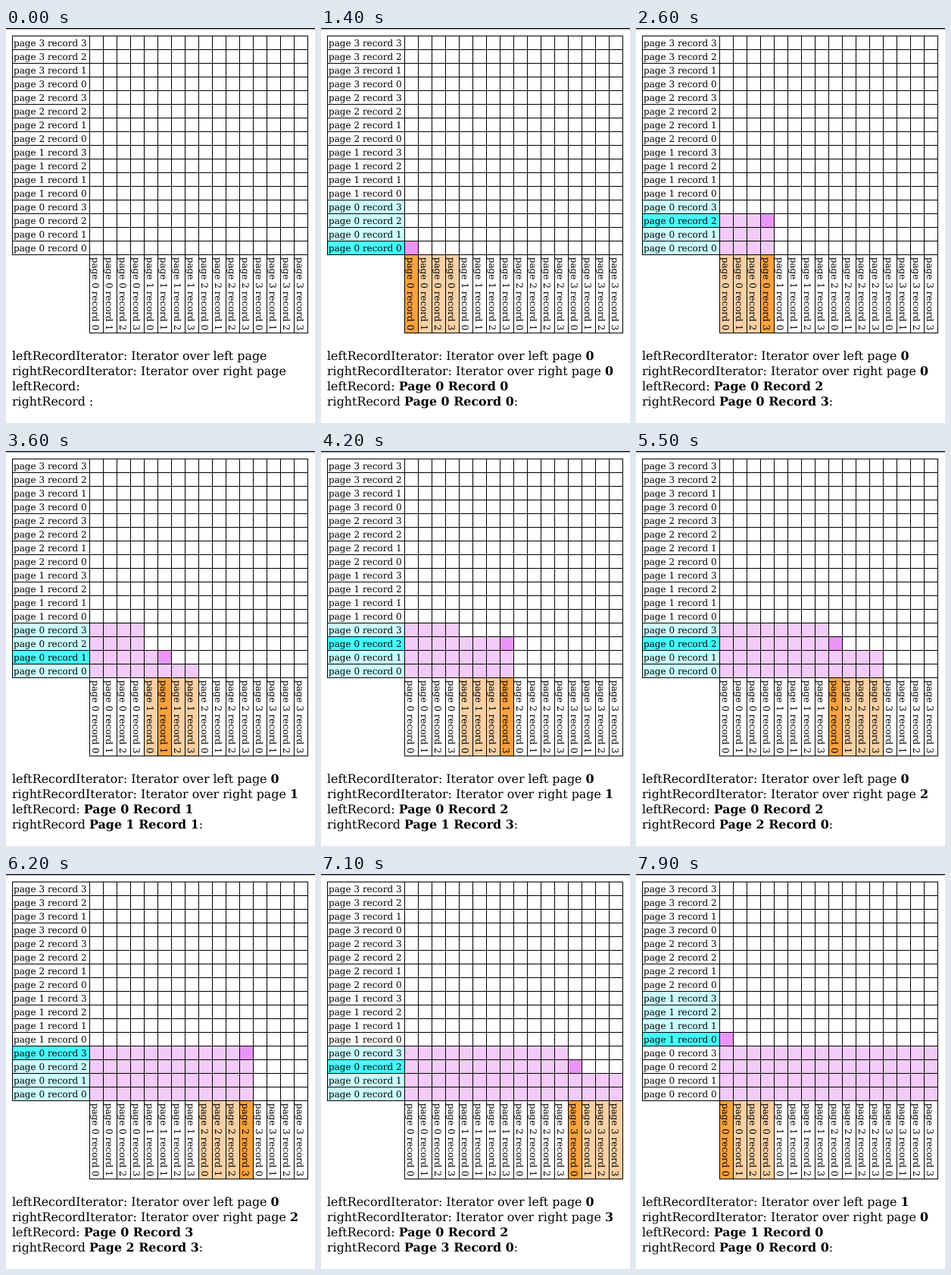
An HTML page for the animation above (8000 ms loop, 408 by 520 pixels).

```html
<!DOCTYPE html>
<html lang="en">
<head>
<meta charset="utf-8">
<title>Block nested loop join</title>
<style>
  html, body { margin: 0; width: 100%; height: 100%; overflow: hidden; background: #fff; }
  svg { display: block; }
  text { font-family: "DejaVu Serif", serif; fill: #000; text-rendering: geometricPrecision; white-space: pre; }
  .label { font-size: 12px; }
  .status { font-size: 15.88px; }
  .value { font-weight: bold; }
</style>
</head>
<body>
<svg id="stage" width="408" height="520" viewBox="0 0 408 520"></svg>
<script>
const LOOP = 8000, START = 1400, FIRST_MOVE = 1500, STEP = 100;
const SIZE = 16, CELL = 18, LEFT = 8, GRID_X = 110, TOP = 10, GRID_Y = 298, BOTTOM = 401;
const RIGHT = GRID_X + SIZE * CELL;
const COLORS = {
  left: ["#ccffff", "#46ffff"],
  right: ["#fad1a5", "#faa240"],
  cell: ["#f3cbf9", "#ea95f9"]
};
const stage = document.getElementById("stage");

function add(tag, attrs, parent = stage, content = "") {
  const node = document.createElementNS("http://www.w3.org/2000/svg", tag);
  for (const key in attrs) node.setAttribute(key, attrs[key]);
  node.textContent = content;
  return parent.appendChild(node);
}
const rect = (x, y, width, height) => add("rect", { x, y, width, height, fill: "#fff" });
const columnX = i => GRID_X + i * CELL;
const rowY = i => GRID_Y - (i + 1) * CELL;
const indexes = [...Array(SIZE).keys()];

rect(0, 0, 408, 1.5).setAttribute("fill", "#18181a");
const leftHeads = indexes.map(i => rect(LEFT, rowY(i), GRID_X - LEFT, CELL));
const rightHeads = indexes.map(i => rect(columnX(i), GRID_Y, CELL, BOTTOM - GRID_Y));
const cells = indexes.map(row => indexes.map(col => rect(columnX(col), rowY(row), CELL, CELL)));

let lines = "";
for (let i = 0; i <= SIZE; i++) {
  lines += `M${LEFT} ${TOP + i * CELL + .5}H${RIGHT + 1}M${columnX(i) + .5} ${TOP}V${BOTTOM + 1}`;
}
lines += `M${LEFT + .5} ${TOP}V${GRID_Y + 1}M${GRID_X} ${BOTTOM + .5}H${RIGHT + 1}`;
add("path", { d: lines, stroke: "#000", fill: "none" });

for (const i of indexes) {
  const name = `page ${i >> 2} record ${i & 3}`;
  add("text", { class: "label", x: 10, y: rowY(i) + 14 }, stage, name);
  add("text", { class: "label", transform: `translate(${columnX(i) + 4} 301.7) rotate(90)` }, stage, name);
}

const values = [
  ["leftRecordIterator: Iterator over left page ", ""],
  ["rightRecordIterator: Iterator over right page ", ""],
  ["leftRecord: ", ""],
  ["rightRecord ", ":"]
].map(([before, after], i) => {
  const line = add("text", { class: "status", x: 8, y: 437 + i * 20 });
  add("tspan", {}, line, before);
  const value = add("tspan", { class: "value" }, line);
  add("tspan", {}, line, after);
  return value;
});

// Pages form the outer loops, records the inner ones; the right side runs fastest.
const visitOrder = (row, col) => (row >> 2) * 64 + (col >> 2) * 16 + (row & 3) * 4 + (col & 3);

function paintHeads(heads, current, colors) {
  heads.forEach((head, i) => {
    const inPage = current >= 0 && i >> 2 === current >> 2;
    head.setAttribute("fill", inPage ? colors[+(i === current)] : "#fff");
  });
}

function render(time) {
  const active = time >= START;
  const step = active ? Math.max(0, Math.floor((time - FIRST_MOVE) / STEP)) : -1;
  const leftPage = step >> 6, rightPage = step >> 4 & 3;
  const leftRecord = step >> 2 & 3, rightRecord = step & 3;
  paintHeads(leftHeads, active ? leftPage * 4 + leftRecord : -1, COLORS.left);
  paintHeads(rightHeads, active ? rightPage * 4 + rightRecord : -1, COLORS.right);
  cells.forEach((line, row) => line.forEach((cell, col) => {
    const order = visitOrder(row, col);
    cell.setAttribute("fill", order > step ? "#fff" : COLORS.cell[+(order === step)]);
  }));
  const texts = [leftPage, rightPage, `Page ${leftPage} Record ${leftRecord}`, `Page ${rightPage} Record ${rightRecord}`];
  values.forEach((value, i) => { value.textContent = active ? texts[i] : ""; });
}

let origin;
function tick(now) {
  origin ??= now;
  render((now - origin) % LOOP);
  requestAnimationFrame(tick);
}
render(0);
requestAnimationFrame(tick);
</script>
</body>
</html>
```
